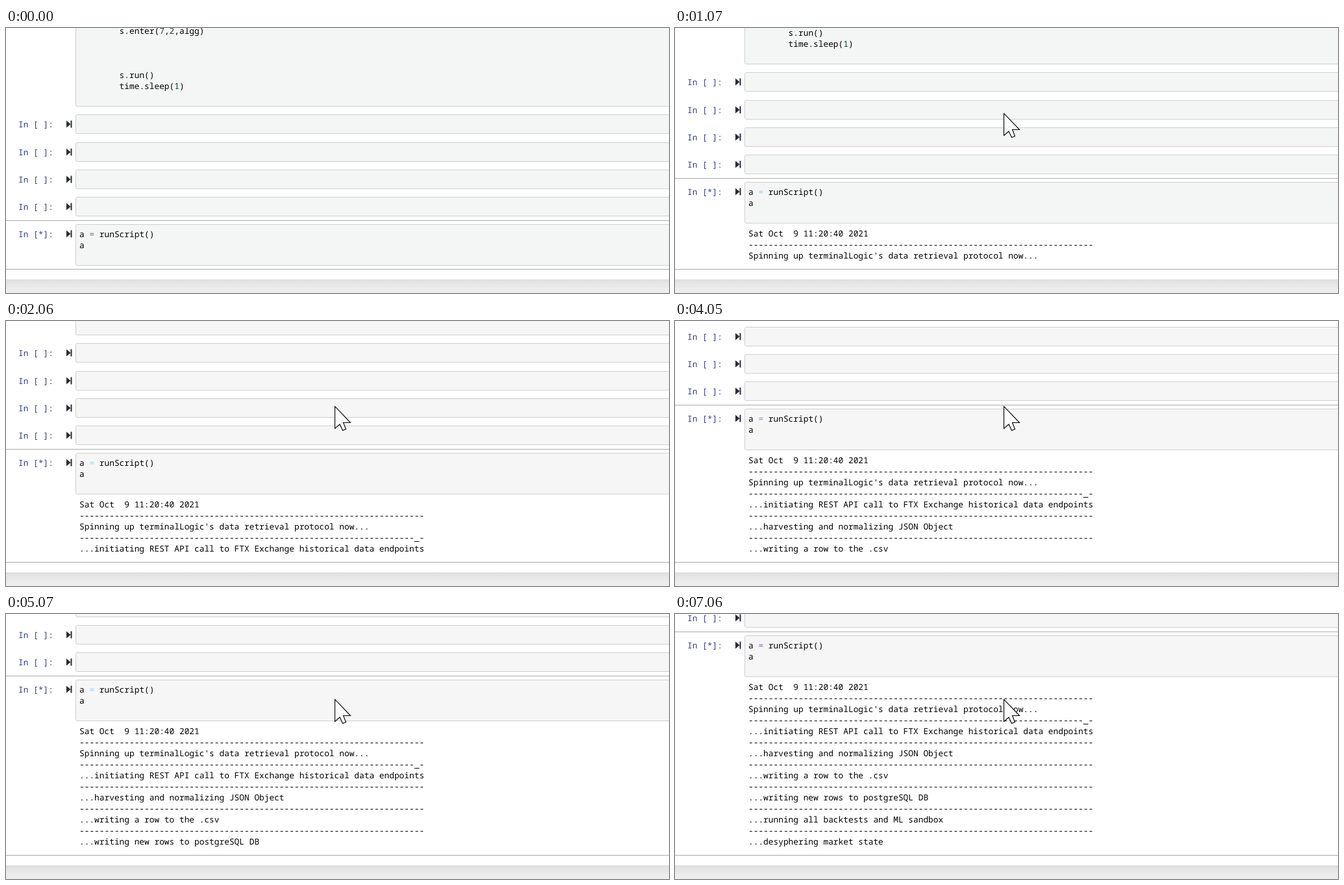
These frames come from a looping animation (1021 by 408 pixels, 8 s). An HTML page:

```html
<!DOCTYPE html>
<html>
<head>
<meta charset="utf-8">
<style>
html, body { margin: 0; width: 100%; height: 100%; overflow: hidden; background: #fff; }
svg { display: block; }
text { font: 12.83px 'Noto Sans Mono', monospace; white-space: pre; text-rendering: geometricPrecision; }
.prompt { fill: #303f8f; }
.num { fill: #143; }
.box { stroke: #cfcfcf; }
.rule { stroke: #ababab; }
</style>
</head>
<body>
<svg width="1021" height="408" viewBox="0 0 1021 408">
  <defs>
    <linearGradient id="shade" x2="0" y2="1">
      <stop offset="0" stop-color="#dedede"/>
      <stop offset=".35" stop-color="#e7e7e7"/>
      <stop offset=".75" stop-color="#ededed"/>
    </linearGradient>
  </defs>
  <g id="page"></g>
  <path class="rule" d="M0 371.5H1021"/>
  <rect y="387" width="1021" height="21" fill="url(#shade)"/>
  <path id="cursor" d="M.5 .5V34.5L8 28 12.5 37.5 17.5 35.5 13.5 25.5H24.5Z" fill="#fdfcfc" stroke="#000" stroke-width="1.1"/>
</svg>
<script>
const page = document.getElementById('page');
const cursor = document.getElementById('cursor');

const LOOP = 8000, CELL = 302, PITCH = 42.15, LINE = 17;
const steps = [0, 1070, 2060, 3050, 4050, 5070, 6060, 7060];
const equals = ['#666', '#84d4f4', '#84d4f4', '#a58aa5', '#a878b8', '#84d4f4', '#a04fd0', '#a03fd8'];
const moves = [[390, 788, 231], [460, 592, 119], [530, 506, 131]];

const dashes = '-'.repeat(69);
const output = [
  'Sat Oct  9 11:20:40 2021',
  dashes, "Spinning up terminalLogic's data retrieval protocol now...",
  '-'.repeat(67) + '_-', '...initiating REST API call to FTX Exchange historical data endpoints',
  dashes, '...harvesting and normalizing JSON Object',
  dashes, '...writing a row to the .csv',
  dashes, '...writing new rows to postgreSQL DB',
  dashes, '...running all backtests and ML sandbox',
  dashes, '...desyphering market state'
];

const text = (x, y, s, cls = '') => `<text x="${x}" y="${y}" class="${cls}">${s}</text>`;
const box = (y, h) => `<rect class="box" x="107.5" y="${y + .5}" width="940" height="${h}" rx="2"/>`;
const num = n => `<tspan class="num">${n}</tspan>`;

function cell(y, h, mark) {
  return box(y, h) + text(19, y + 20, `In [${mark}]:`, 'prompt') +
    `<path fill="#2b2b38" d="M93 ${y + 9.5}l6.5 5.5-6.5 5.5zM99.5 ${y + 9.5}h2v11h-2z"/>`;
}

let html = box(-60, 180) +
  text(174.6, 9, `s.enter(${num(7)},${num(2)},algg)`) +
  text(174.6, 77, 's.run()') +
  text(174.6, 94, `time.sleep(${num(1)})`);
for (let k = 4; k > 0; k--) html += cell(Math.round(CELL - PITCH * k), 29, ' ');
html += '<path class="rule" d="M0 296.5H1021"/>' + cell(CELL, 63, '*') +
  text(113, 322, 'a <tspan id="equals">=</tspan> runScript()') + text(113, 339, 'a');
output.forEach((s, i) => html += text(113, 386 + LINE * i, s, 'out'));
page.innerHTML = html;

const rows = page.querySelectorAll('.out');
const sign = document.getElementById('equals');

function draw(now) {
  const t = now % LOOP;
  const n = steps.filter(s => s <= t).length - 1;
  const shift = n ? 31 + 2 * LINE * n : 0;
  page.setAttribute('transform', `translate(0 ${-shift})`);
  page.setAttribute('fill', '#000');
  page.querySelectorAll('.box').forEach(b => b.setAttribute('fill', n < 2 ? '#f4f6f5' : '#f6f6f6'));
  rows.forEach((r, i) => r.style.display = n && i <= 2 * n ? '' : 'none');
  sign.setAttribute('fill', equals[n]);

  const at = moves.filter(m => m[0] <= t).pop();
  cursor.style.display = at ? '' : 'none';
  if (at) cursor.setAttribute('transform', `translate(${at[1]} ${at[2]})`);
}

const start = performance.now();
function tick() {
  draw(performance.now() - start);
  requestAnimationFrame(tick);
}
tick();
</script>
</body>
</html>
```
